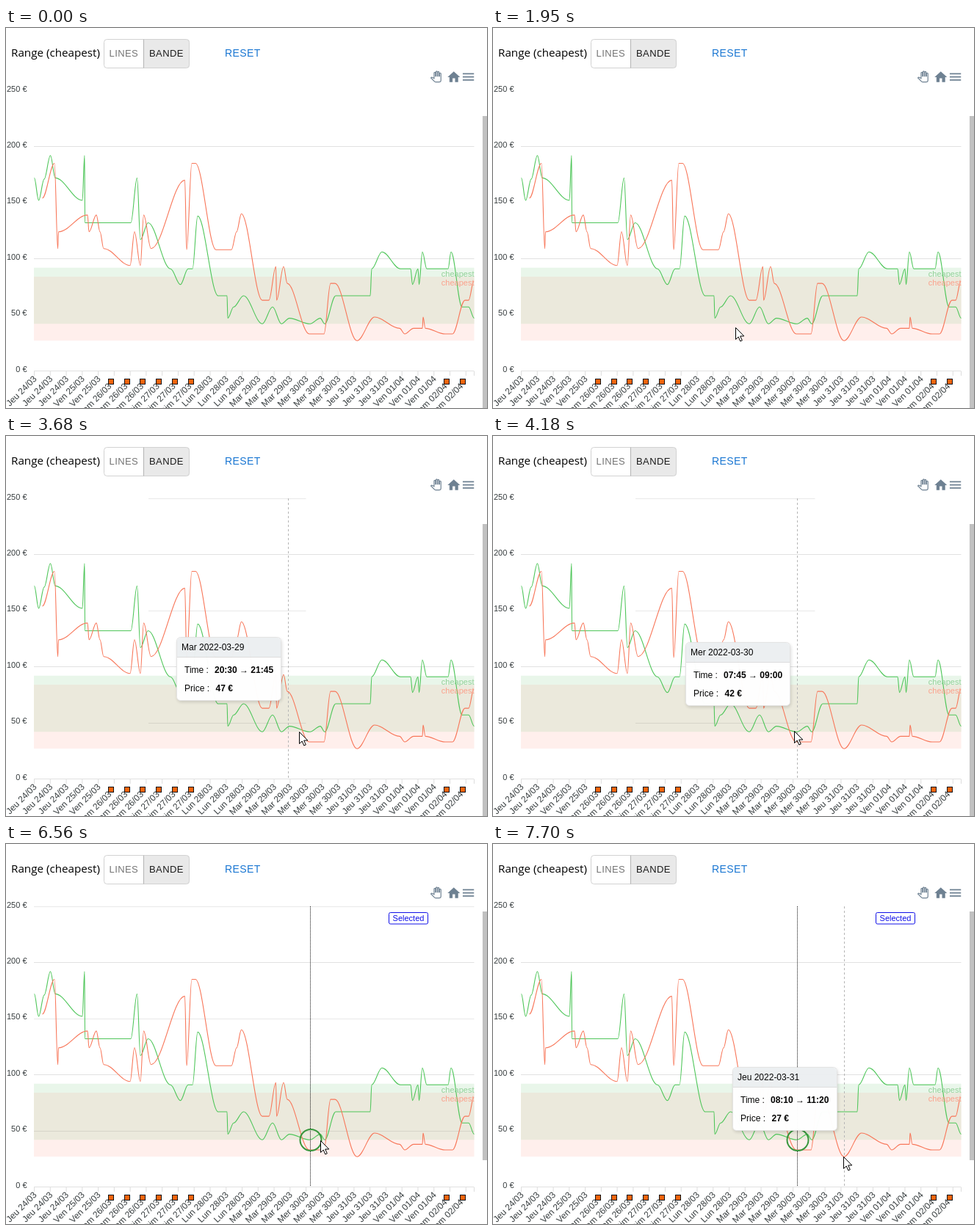
Animation of 655 by 518 pixels, one loop 8000 ms. Source, as an HTML page:

```html
<!DOCTYPE html>
<html lang="fr">
<head>
<meta charset="utf-8">
<title>Price range chart</title>
<style>
html, body { margin: 0; width: 100%; height: 100%; overflow: hidden; background: #fff; }
svg { display: block; width: 655px; height: 518px; font: 11px "Liberation Sans", Arial, sans-serif; }
.head { font: 15.2px "Open Sans", sans-serif; }
.toggle { font-size: 13px; letter-spacing: .4px; }
.reset { font-size: 14px; letter-spacing: .4px; fill: #1976d2; }
.axis { fill: #373d3f; }
.dates { font-size: 12px; fill: #373d3f; }
.end { text-anchor: end; }
.line { fill: none; stroke-width: 1.1; stroke-linejoin: round; }
.icon { fill: #6e8192; }
#tip { font-size: 12px; }
#tip .val { font-weight: bold; }
#tip .box { filter: drop-shadow(1px 2px 2px rgba(0,0,0,.14)); }
</style>
</head>
<body>
<svg viewBox="0 0 655 518">
  <text class="head" x="7" y="39">Range (cheapest)</text>
  <path d="M187.500 15.500H246a4 4 0 0 1 4 4V50.500a4 4 0 0 1-4 4H187.500z" fill="#e9e9e9"/>
  <rect x="133.500" y="15.500" width="116" height="39" rx="4" fill="none" stroke="#d2d2d2"/>
  <path d="M187.500 15.500v39" stroke="#b4b4b4"/>
  <text class="toggle" x="140.500" y="39" fill="#757575">LINES</text>
  <text class="toggle" x="195" y="39" fill="#1c1c1c">BANDE</text>
  <text class="reset" x="298" y="39">RESET</text>

  <path transform="translate(578 58.800) scale(.62)" fill="#fff" stroke="#6e8192" stroke-width="1.900"
    d="M23 5.500V20c0 2.200-1.800 4-4 4h-7.300c-1.100 0-2.100-.4-2.850-1.200L1 14.800l1.300-1.200c.4-.3.900-.4 1.400-.1L8 15.900V4a1.500 1.500 0 0 1 3 0v7h1V1.500a1.500 1.500 0 0 1 3 0V11h1V2.500a1.500 1.500 0 0 1 3 0V11h1V5.500a1.500 1.500 0 0 1 3 0z"/>
  <path class="icon" transform="translate(599.600 56.700) scale(.85)" d="M10 20v-6h4v6h5v-8h3L12 3 2 12h3v8z"/>
  <path class="icon" transform="translate(619.400 56.500) scale(.85)" d="M3 18h18v-2H3zm0-5h18v-2H3zm0-7v2h18V6z"/>

  <g id="grid"></g>
  <g id="bands"></g>
  <path id="faint" stroke="#000" stroke-opacity=".09"/>
  <g id="dates" class="dates"></g>
  <path id="cross" stroke="#b6b6b6" stroke-dasharray="3"/>
  <path id="green" class="line" stroke="#4fc65a"/>
  <path id="red" class="line" stroke="#f8775a"/>
  <text class="end" x="637.500" y="339" fill="#93d199">cheapest</text>
  <text class="end" x="637.500" y="351" fill="#fba18c">cheapest</text>

  <g id="pick">
    <path d="M414.500 85V467" stroke="#111" stroke-dasharray="1"/>
    <circle cx="415" cy="403.500" r="14.500" fill="none" stroke="#37963c" stroke-width="2"/>
    <rect x="521.500" y="93.500" width="53" height="15.500" rx="2" fill="#fff" stroke="#1010e8"/>
    <text x="548" y="105" text-anchor="middle" fill="#1010e8">Selected</text>
  </g>

  <g id="tip">
    <rect class="box" x=".5" y=".5" width="142" height="86" rx="5" fill="#fff" stroke="#e3e3e3"/>
    <path d="M1 27V5.500a4.500 4.500 0 0 1 4.500-4.500H137.500a4.500 4.500 0 0 1 4.500 4.500V27z" fill="#eceff1"/>
    <path d="M1 27.500H142" stroke="#ddd"/>
    <text id="day" x="7" y="18"></text>
    <text x="11" y="49">Time :</text><text id="time" class="val" x="52" y="49"></text>
    <text x="11" y="74">Price :</text><text id="price" class="val" x="53.500" y="74"></text>
  </g>

  <rect id="bar" x="649" width="6" fill="#c1c1c1"/>
  <path id="cursor" d="M.5.500V16.500L4.200 13 6.800 19 9.300 17.900 6.700 12H11.800z" fill="#fff" stroke="#000"/>
</svg>
<script>
const LEFT = 38, RIGHT = 637.5, LOOP = 8000, PICK = 5500;

const $ = id => document.getElementById(id);
const set = (el, attrs) => { for (const k in attrs) el.setAttribute(k, attrs[k]); return el; };
const add = (parent, tag, attrs, text = '') => {
  const el = set(document.createElementNS('http://www.w3.org/2000/svg', tag), attrs);
  el.textContent = text;
  return parent.appendChild(el);
};
const clamp = v => Math.max(0, Math.min(1, v));
const mix = (a, b, p) => a + (b - a) * p;
const priceY = p => 467.5 - 1.53 * p;
const rows = prices => prices.map(p => `M${LEFT} ${Math.floor(priceY(p)) + .5}H${RIGHT}`).join('');

// Each "x,price" key point is a level stop, joined by S-shaped curves
function curve(keys) {
  const pts = keys.split(' ').map(key => key.split(',').map(Number));
  return pts.reduce((d, [x, p], i) => {
    const y = priceY(p);
    if (!i) return `M${x} ${y}`;
    const [px, pp] = pts[i - 1], ease = (x - px) * .35;
    return d + `C${px + ease} ${priceY(pp)} ${x - ease} ${y} ${x} ${y}`;
  }, '');
}

set($('green'), { d: curve('38.5,172 44.5,152 52,171 60.5,192 67,172 104,152 107,192 107.5,132 ' +
  '170,132 178.5,172 183,117 193.5,132 224,91 237.5,77 248,91 254,91 261,138 289,67 301,67 ' +
  '302,47 310,57 323.5,67 349,42 363,57 375,42 386,47 414,42 428,47 434,42 449,67 496,67 ' +
  '498,91 512,106 537,91 551,91 553.5,77 561,91 562.5,77 567,106 573,91 602,91 606,106 ' +
  '621,57 630,57 637.5,47') });
set($('red'), { d: curve('49.5,154 66,185 70.5,109 71.5,124 111,139 113,124 123,139 128,124 ' +
  '133,109 169,94 175,124 183,94 187.5,139 197.5,109 243.5,170 246,108 253,185 258,185 286,108 ' +
  '307,108 314,124 320.5,140 349,63 358,63 367.5,93 368.5,63 378,93 383,78 413,33 433,33 ' +
  '442,78 448,78 478,27 502,48 536,38 543,33 555,38 567,38 568,48 571,38 598,33 608,33 ' +
  '625,63 630,63 637,80') });

function band(top, bottom, fill) {
  const y = priceY(top);
  add($('bands'), 'rect', { x: LEFT, y, width: RIGHT - LEFT, height: priceY(bottom) - y, fill });
}
band(92, 42, '#e9f6ea');
band(84, 27, '#ffefec');
band(84, 42, '#ebe9dc');

for (let p = 0; p <= 250; p += 50) {
  add($('grid'), 'text', { class: 'axis end', x: 28.5, y: 468.5 - 1.527 * p }, p + ' €');
}
add($('grid'), 'path', { d: rows([0, 100, 200]), stroke: '#e1e1e1' });

const weekdays = ['Jeu', 'Ven', 'Sam', 'Dim', 'Lun', 'Mar', 'Mer'];
for (let i = 0; i < 28; i++) {
  const day = Math.floor((i + (i > 4)) / 3);
  const date = day < 8 ? `${24 + day}/03` : `0${day - 7}/04`;
  const x = 38.5 + 21.77 * i;
  const weekend = day % 7 === 2 || day % 7 === 3;
  const [dx, y] = weekend ? [-3, 489] : [4, 479];
  add($('dates'), 'path', { d: `M${x} 468v6`, stroke: '#dcdcdc' });
  add($('dates'), 'text', { class: 'end', transform: `translate(${x + dx} ${y}) rotate(-45)` },
    `${weekdays[day % 7]} ${date}`);
  if (weekend) add($('dates'), 'rect', {
    x: Math.floor(x - 8) + .5, y: 478.5, width: 7, height: 7, fill: '#f2640c', stroke: '#111'
  });
}
add($('dates'), 'path', { d: `M${RIGHT} 468v6`, stroke: '#dcdcdc' });

// Pointer sweeps: x eases out by the given power, y runs evenly
const moves = [
  { start: 560, end: 1560, to: [322, 409], power: 1.5 },
  { start: 1796, end: 2110, to: [337, 406], power: 1.5 },
  { start: 2400, end: 4180, to: [410, 402], power: 1.5 },
  { start: 6440, end: 7600, to: [477, 426], power: 3.2 }
];
function pointer(t) {
  let [x, y] = [209, 497];
  for (const { start, end, to, power } of moves) {
    const p = clamp((t - start) / (end - start));
    x = mix(x, to[0], 1 - (1 - p) ** power);
    y = mix(y, to[1], p);
  }
  return [Math.round(x), Math.round(y)];
}

const stops = [
  { start: 2560, end: 3150, x: 350.5, price: 47, day: 'Mar 2022-03-29', time: '07:45 → 09:00' },
  { start: 3380, end: 3830, x: 384.5, price: 47, day: 'Mar 2022-03-29', time: '20:30 → 21:45' },
  { start: 3850, end: 5620, x: 414.5, price: 42, day: 'Mer 2022-03-30', time: '07:45 → 09:00' },
  { start: 7280, end: 9000, x: 478.5, price: 27, day: 'Jeu 2022-03-31', time: '08:10 → 11:20' }
];

function drawTip(stop, t) {
  const fade = Math.min(clamp((t - stop.start) / 300), clamp((stop.end - t) / 140));
  // A tip still open when the point is picked slides away with the layout
  const [dx, dy] = t >= PICK && stop.start < PICK ? [-57, -53] : [0, 0];
  const left = Math.floor(stop.x - 152) + dx, top = Math.round(priceY(stop.price) - 122) + dy;
  set($('tip'), { transform: `translate(${left} ${top})`, opacity: fade * .98 });
  $('day').textContent = stop.day;
  $('time').textContent = stop.time;
  $('price').textContent = stop.price + ' €';
}

function drawFaint(stop, picked) {
  let d = '';
  if (picked && !stop) d = rows([50, 150, 250]);
  if (!picked && stop) d = rows([50, 150, 250]).replaceAll('M' + LEFT, 'M194').replaceAll('H' + RIGHT, 'H' + (stop.x + 24));
  set($('faint'), { d });
}

function draw(t) {
  const beat = Math.floor((t - 45) / 125) * 125 + 45;
  set($('cursor'), {
    transform: `translate(${pointer(beat)})`,
    visibility: t < 560 ? 'hidden' : 'visible'
  });

  const stop = stops.find(s => t >= s.start && t < s.end);
  const picked = t >= PICK;
  set($('tip'), { visibility: stop ? 'visible' : 'hidden' });
  set($('cross'), { d: stop ? `M${stop.x} 85V467.5` : '' });
  if (stop) drawTip(stop, t);
  drawFaint(stop, picked);

  set($('pick'), { visibility: picked ? 'visible' : 'hidden' });
  set($('bar'), picked ? { y: 92, height: 339 } : { y: 120, height: 398 });
}

const begin = performance.now();
function tick() {
  draw((performance.now() - begin) % LOOP);
  requestAnimationFrame(tick);
}
tick();
</script>
</body>
</html>
```
